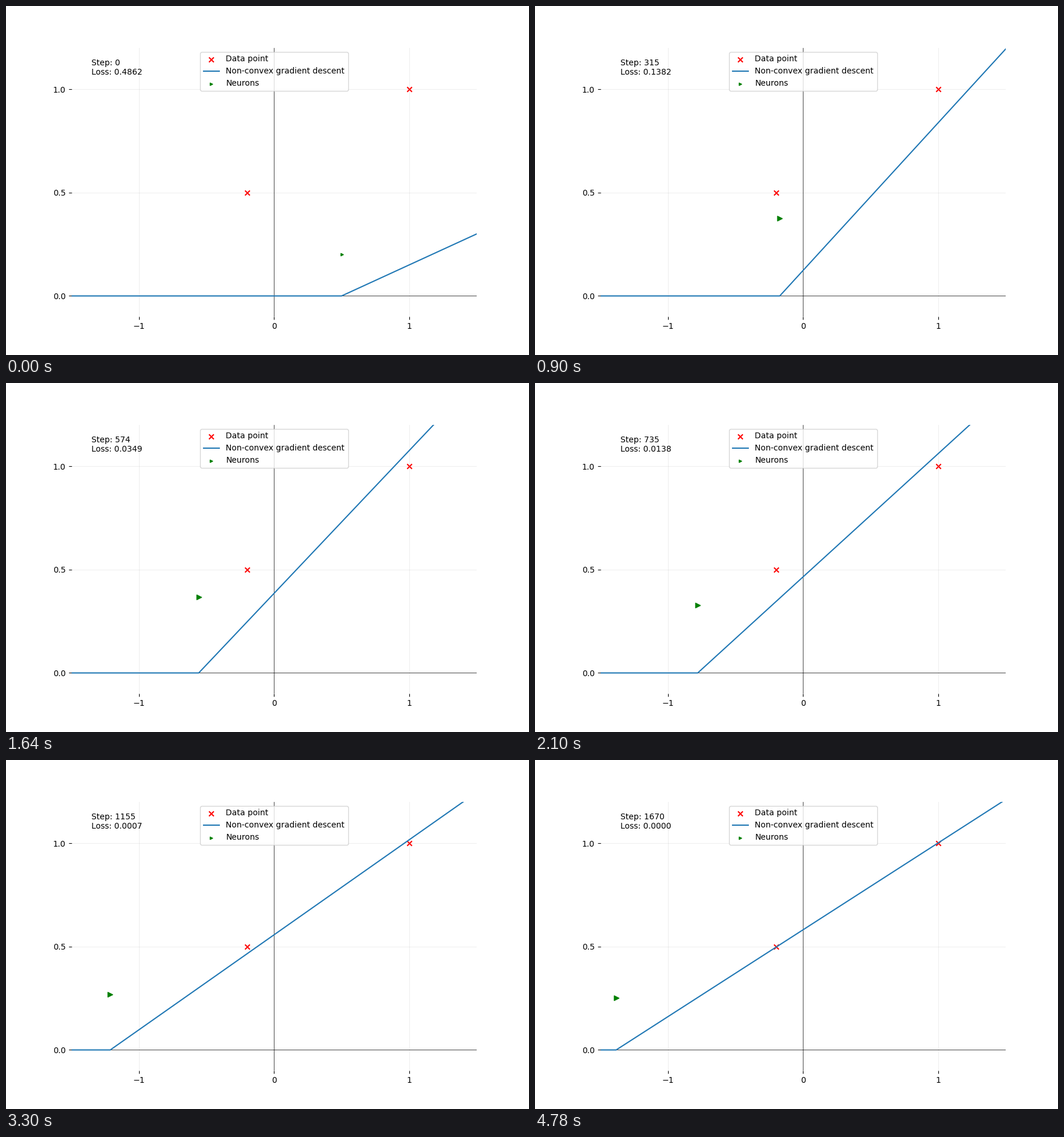
These frames come from a looping animation (900 by 600 pixels, 4.8 s). A matplotlib script:

```python
import numpy as np
import matplotlib.pyplot as plt
from matplotlib.animation import FuncAnimation

FRAMES, INTERVAL = 240, 20
STRIDE, LAST_STEP = 7, 1670
X = np.array([-0.2, 1.0])
Y = np.array([0.5, 1.0])


def train(steps, lr=1e-3, beta1=0.9, beta2=0.999, eps=1e-8):
    """Fit a * relu(w * x + b) with Adam; return (w, b, a) before each step."""
    p = np.array([0.3, -0.15, 1.0])
    m, v = np.zeros(3), np.zeros(3)
    path = [p.copy()]
    for t in range(1, steps + 1):
        w, b, a = p
        hidden = np.maximum(w * X + b, 0)
        err = a * hidden - Y
        active = err * (hidden > 0)
        grad = np.array([a * (active @ X), a * active.sum(), err @ hidden])
        m = beta1 * m + (1 - beta1) * grad
        v = beta2 * v + (1 - beta2) * grad ** 2
        p = p - lr * (m / (1 - beta1 ** t)) / (np.sqrt(v / (1 - beta2 ** t)) + eps)
        path.append(p.copy())
    return path


path = train(LAST_STEP)

plt.rcParams["font.family"] = "DejaVu Sans"
fig, ax = plt.subplots(figsize=(9, 6), dpi=100)
ax.set(xlim=(-1.5, 1.5), ylim=(-0.1, 1.2),
       xticks=[-1, 0, 1], yticks=[0, 0.5, 1])
ax.spines[:].set_visible(False)
ax.grid(alpha=0.2)
ax.axhline(0, color="black", lw=0.5)
ax.axvline(0, color="black", lw=0.5)

ax.scatter(X, Y, color="red", marker="x", label="Data point")
line, = ax.plot([], [], label="Non-convex gradient descent")
neuron = ax.scatter([0.5], [0.2], s=10, color="green", marker=">",
                    label="Neurons")
ax.legend(loc="upper center")
info = ax.text(0.05, 0.9, "", transform=ax.transAxes)


def update(i):
    step = min(i * STRIDE, LAST_STEP)
    w, b, a = path[step]
    kink, slope = -b / w, a * w
    xs = np.array([-1.5, kink, 1.5])
    line.set_data(xs, slope * np.maximum(xs - kink, 0))
    neuron.set_offsets([[kink, 0.2 + 0.427 * (slope - 0.3)]])
    neuron.set_sizes([36 if i else 10])
    loss = np.mean((slope * np.maximum(X - kink, 0) - Y) ** 2)
    info.set_text(f"Step: {step}\nLoss: {loss:.4f}")
    return line, neuron, info


anim = FuncAnimation(fig, update, frames=FRAMES, interval=INTERVAL,
                     repeat=True, repeat_delay=0)
plt.show()
```
